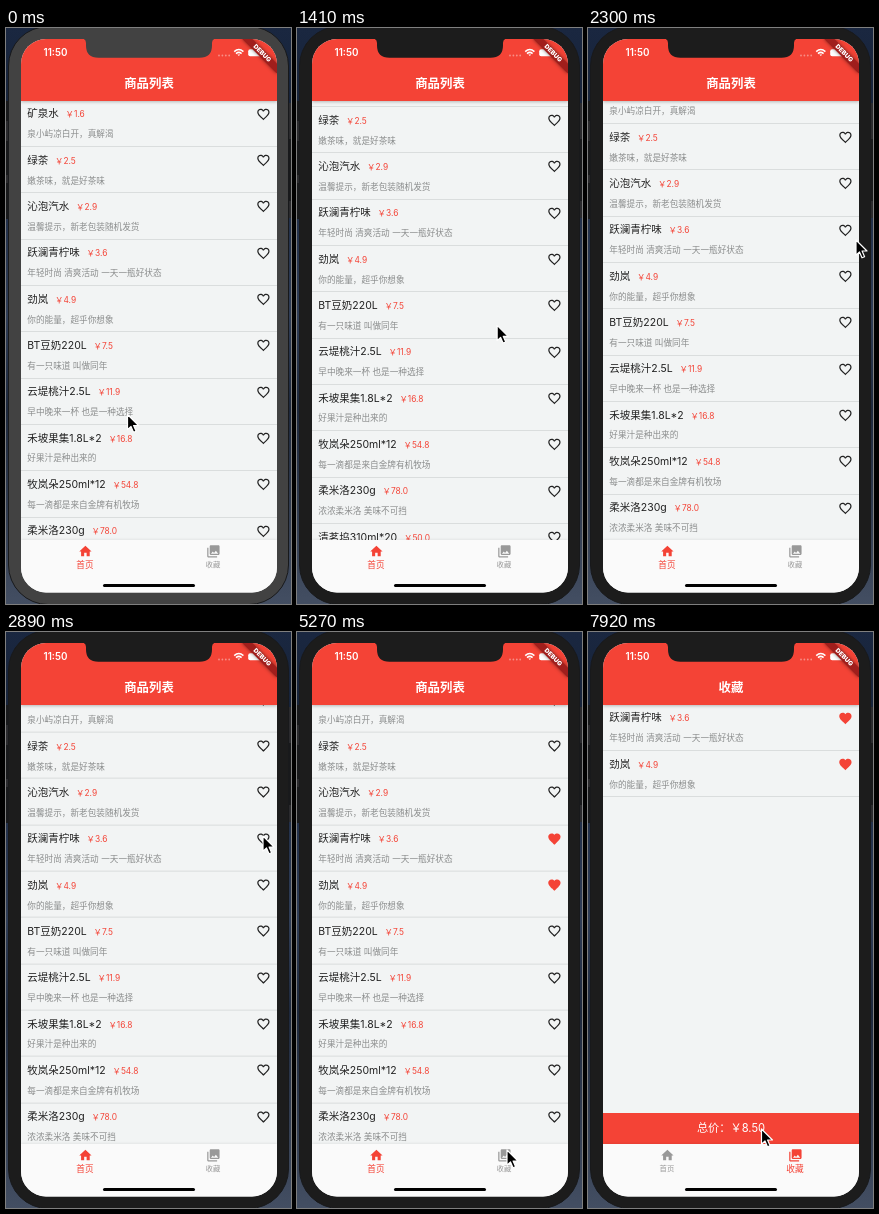
Write an HTML page that moves like this. It is 285 px wide and 576 px high and loops after 8000 ms.

```html
<!DOCTYPE html>
<html lang="zh-CN">
<head>
<meta charset="utf-8">
<title>商品列表</title>
<style>
  html, body { margin: 0; width: 100%; height: 100%; overflow: hidden; }
  body {
    position: relative;
    font-family: Inter, "Noto Sans CJK SC", "Noto Sans CJK", sans-serif;
    --red: #f44336;
    --bezel: #424242;
    background: linear-gradient(#1a2740, #16233a 13%, #2a2a2d 13%, #2a2a2d 33%, #22304a 33%, #2f3d56 50%, #1d283c 66%, #434e62);
  }
  body.active { --bezel: #1c1c1c; }
  body > *, .app *, .phone i { position: absolute; }
  svg { overflow: visible; }
  .phone {
    left: 2px; top: -2px; width: 279px; height: 577px;
    border: 1px solid #18191b; border-radius: 40px; background: var(--bezel);
  }
  .phone i { width: 2px; background: #18191b; }
  .app {
    inset: 0; background: #f2f4f4;
    clip-path: inset(11px 14px 11.6px 15px round 25px);
  }
  .list { left: 15px; top: 72.8px; width: 256px; height: 439.6px; overflow: hidden; }
  .rows { left: 0; top: 0; width: 100%; }
  .row { left: 0; width: 100%; height: 46.33px; box-sizing: border-box; border-bottom: 1px solid #dadddd; }
  .row div { left: 6.3px; white-space: nowrap; line-height: 20px; }
  .name { top: 3.5px; font-size: 10.5px; color: #222; }
  .name span { position: static; margin-left: 6.8px; font-size: 8.4px; color: var(--red); }
  .row .note { top: 23.4px; font-size: 8.65px; color: #8b8d8d; }
  .row svg { left: 235.1px; top: 5.9px; width: 14.8px; height: 14.8px; fill: #222; }
  .row.liked svg { fill: var(--red); }
  .liked .hole { display: none; }
  .hole { fill: #f2f4f4; }
  .bar {
    left: 15px; top: 11px; width: 256px; height: 61.8px;
    background: var(--red); box-shadow: 0 1px 3px rgba(0, 0, 0, .25);
  }
  .bar b { left: 0; width: 100%; top: 35px; line-height: 20px; text-align: center; font-size: 12.4px; font-weight: 600; color: #fff; }
  .clock { left: 37.5px; top: 15px; line-height: 20px; font-size: 9.8px; font-weight: 600; color: #fff; }
  .debug {
    left: 231.4px; top: 22.2px; width: 49.4px; height: 7.4px;
    transform: rotate(45deg); background: #a01e1c;
    box-shadow: 0 0 4px rgba(0, 0, 0, .5);
    font: 900 6.3px/7.6px Inter, sans-serif; text-align: center; color: #fff;
  }
  .total {
    left: 15px; top: 481px; width: 256px; height: 31.4px; line-height: 31px;
    background: var(--red); color: #fff; font-size: 11.2px; text-align: center;
  }
  .nav { left: 15px; top: 512.4px; width: 256px; height: 53px; background: #fafafa; box-shadow: 0 0 3px rgba(0, 0, 0, .12); }
  .tab { width: 128px; height: 40px; top: 0; fill: currentColor; }
  .tab svg { left: 56.6px; top: 3.2px; width: 14.8px; height: 14.8px; }
  .tab span { left: 0; width: 100%; top: 14.8px; line-height: 20px; text-align: center; }
  .pill { left: 82.2px; top: 43.9px; width: 91.5px; height: 3.1px; border-radius: 2px; background: #000; }
  #cursor { left: 0; top: 0; width: 12px; height: 19px; }
</style>
</head>
<body>
<div class="phone">
  <i style="left:-3px;top:74px;height:20px"></i>
  <i style="left:-3px;top:114px;height:34px"></i>
  <i style="left:-3px;top:156px;height:36px"></i>
  <i style="right:-3px;top:112px;height:62px"></i>
</div>

<div class="app">
  <div class="list" id="home"><div class="rows"></div></div>
  <div class="list" id="saved"><div class="rows"></div></div>
  <div class="bar"><b id="title"></b></div>
  <span class="clock">11:50</span>
  <svg width="285" height="40" style="left:0;top:0">
    <g fill="#fff" opacity=".4">
      <circle cx="213" cy="27.5" r=".9"/><circle cx="216.4" cy="27.5" r=".9"/>
      <circle cx="219.8" cy="27.5" r=".9"/><circle cx="223.2" cy="27.5" r=".9"/>
    </g>
    <g fill="none" stroke="#fff" stroke-width="1.5">
      <path d="M228.2 23.6Q232.8 19.4 237.4 23.6M230 25.6Q232.8 23.1 235.6 25.6"/>
      <path d="M231.4 26.5h2.8l-1.4 1.6z" fill="#fff" stroke="none"/>
      <rect x="242.2" y="21.2" width="14.4" height="7" rx="2" fill="#fff" stroke="none"/>
    </g>
    <path fill="var(--bezel)" d="M76 10.5Q80 11 80 15V17.5Q80 29.8 92.5 29.8H193.5Q206 29.8 206 17.5V15Q206 11 210 10.5Z"/>
  </svg>
  <div class="debug">DEBUG</div>
  <div class="total" id="total">总价：￥8.50</div>
  <div class="nav">
    <div class="tab" style="left:0">
      <svg viewBox="0 0 24 24"><path d="M10 20v-6h4v6h5v-8h3L12 3 2 12h3v8z"/></svg>
      <span>首页</span>
    </div>
    <div class="tab" style="left:128px">
      <svg viewBox="0 0 24 24"><path d="M22 16V4c0-1.1-.9-2-2-2H8c-1.1 0-2 .9-2 2v12c0 1.1.9 2 2 2h12c1.1 0 2-.9 2-2zm-11-4l2.03 2.71L16 11l4 5H8l3-4zM2 6v14c0 1.1.9 2 2 2h14v-2H4V6H2z"/></svg>
      <span>收藏</span>
    </div>
    <div class="pill"></div>
  </div>
</div>

<svg id="cursor" viewBox="0 0 12 19">
  <path d="M0 0V15.2L3.5 12 6 17.8 8.6 16.7 6.1 11H11Z" fill="#000" stroke="#fff" stroke-width="1.2" stroke-linejoin="round"/>
</svg>

<script>
const LOOP = 8000, PITCH = 46.33;
const $ = s => document.querySelector(s);

const goods = [
  ['矿泉水', '1.6', '泉小屿凉白开，真解渴'],
  ['绿茶', '2.5', '嫩茶味，就是好茶味'],
  ['沁泡汽水', '2.9', '温馨提示，新老包装随机发货'],
  ['跃澜青柠味', '3.6', '年轻时尚 清爽活动 一天一瓶好状态'],
  ['劲岚', '4.9', '你的能量，超乎你想象'],
  ['BT豆奶220L', '7.5', '有一只味道 叫做同年'],
  ['云堤桃汁2.5L', '11.9', '早中晚来一杯 也是一种选择'],
  ['禾坡果集1.8L*2', '16.8', '好果汁是种出来的'],
  ['牧岚朵250ml*12', '54.8', '每一滴都是来自金牌有机牧场'],
  ['柔米洛230g', '78.0', '浓浓柔米洛 美味不可挡'],
  ['清茗坞310ml*20', '50.0', '清清爽爽 一罐就好']
];

const heart = `<svg viewBox="0 0 24 24">
  <path d="M12 21.35l-1.45-1.32C5.4 15.36 2 12.28 2 8.5 2 5.42 4.42 3 7.5 3c1.74 0 3.41.81 4.5 2.09C13.09 3.81 14.76 3 16.5 3 19.58 3 22 5.42 22 8.5c0 3.78-3.4 6.86-8.55 11.54z"/>
  <path class="hole" d="M12 18.65C7.14 14.24 4 11.39 4 8.5 4 6.5 5.5 5 7.5 5c1.54 0 3.04.99 3.57 2.36h1.87C13.46 5.99 14.96 5 16.5 5c2 0 3.5 1.5 3.5 3.5 0 2.89-3.14 5.74-8 10.15z"/></svg>`;

const row = ([name, price, note], i, cls = '') =>
  `<div class="row ${cls}" style="top:${i * PITCH}px">
    <div class="name">${name}<span>￥${price}</span></div>
    <div class="note">${note}</div>${heart}</div>`;

const homeRows = $('#home .rows');
homeRows.innerHTML = goods.map((g, i) => row(g, i)).join('');
$('#saved .rows').innerHTML = goods.slice(3, 5).map((g, i) => row(g, i, 'liked')).join('');
const tabs = [...document.querySelectorAll('.tab')];

// time, then values
const scrollPath = [[0, 0], [600, 0], [750, 20.4], [966, 30], [1409, 40], [1705, 40.7], [2001, 30], [2296, 23], [2887, 18.4]];
const cursorPath = [
  [0, 121.5, 386.5], [450, 129.5, 427], [600, 129.5, 427], [750, 134, 366], [966, 150, 345],
  [1261, 150, 345], [1557, 250, 250], [1705, 300, 230], [2148, 300, 215], [2296, 268, 212],
  [2444, 261, 208], [2887, 257, 204], [3774, 257, 204], [4218, 254.5, 250], [4514, 254.5, 250],
  [5252, 210, 518], [5843, 210, 518], [5991, 209.5, 519], [6139, 209.5, 519], [6583, 263, 88],
  [6879, 266, 130], [7174, 190, 541], [7322, 141.5, 501.5], [7913, 173.5, 497]
];

function along(path, t) {
  const i = path.findIndex(p => p[0] > t);
  if (i < 0) return path[path.length - 1].slice(1);
  const a = path[i - 1], b = path[i], k = (t - a[0]) / (b[0] - a[0]);
  return a.slice(1).map((v, n) => v + (b[n + 1] - v) * k);
}

const snap = t => t < 966
  ? Math.min(750, Math.floor(t / 150) * 150)
  : 966 + Math.floor((t - 966) / 147.8 + 1e-6) * 147.8;

function styleTab(tab, on) {
  const mix = (a, b) => Math.round(a + (b - a) * on);
  tab.style.color = `rgb(${mix(153, 244)},${mix(153, 67)},${mix(153, 54)})`;
  tab.lastElementChild.style.fontSize = 7.4 + 1.25 * on + 'px';
}

function draw(now) {
  const t = snap(now % LOOP);
  const saved = t > 5540;
  const shift = t > 5690 ? 1 : saved ? .5 : 0;
  const [x, y] = along(cursorPath, t);

  document.body.classList.toggle('active', t >= 750);
  homeRows.style.transform = `translateY(${-along(scrollPath, t)[0]}px)`;
  homeRows.children[3].classList.toggle('liked', t > 3620);
  homeRows.children[4].classList.toggle('liked', t > 4650);
  $('#home').style.display = saved ? 'none' : '';
  $('#saved').style.display = $('#total').style.display = saved ? '' : 'none';
  $('#title').textContent = saved ? '收藏' : '商品列表';
  styleTab(tabs[0], 1 - shift);
  styleTab(tabs[1], shift);
  $('#cursor').style.transform = `translate(${x}px, ${y}px)`;
}

const start = performance.now();
function tick() {
  draw(performance.now() - start);
  requestAnimationFrame(tick);
}
tick();
</script>
</body>
</html>
```
